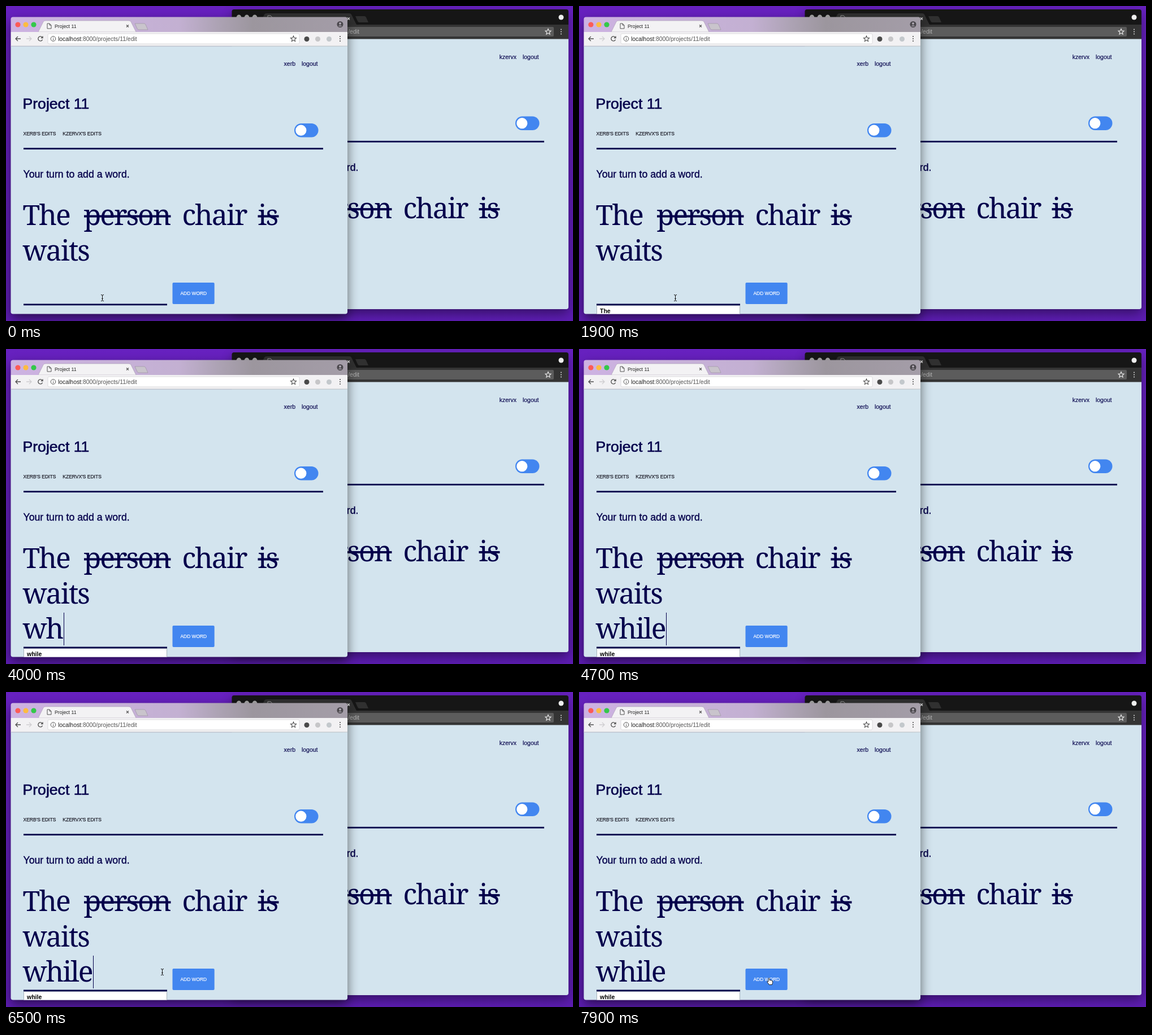
Write an HTML page that moves like this. It is 1003 px wide and 558 px high and loops after 8000 ms.

```html
<!DOCTYPE html>
<html lang="en">
<head>
<meta charset="utf-8">
<title>Project 11</title>
<style>
html, body { margin: 0; width: 100%; height: 100%; overflow: hidden; background: #6120b7; }
svg { display: block; width: 1003px; height: 558px; }
text { font-family: "Liberation Sans", Arial, sans-serif; fill: #04004b; white-space: pre; }
.nav { font-size: 10.5px; stroke: #04004b; stroke-width: .15; }
.title { font-size: 26.6px; stroke: #04004b; stroke-width: .6; }
.turn { font-size: 17.7px; stroke: #04004b; stroke-width: .35; }
.tab { font-size: 8.5px; fill: #1c1c28; stroke: #1c1c28; stroke-width: .25; }
.word { font-family: "Noto Serif", "Liberation Serif", serif; font-size: 50px; letter-spacing: -2px; }
.btn { font-size: 8.4px; fill: #fff; stroke: #fff; stroke-width: .2; }
.hint { font-size: 10.5px; font-weight: bold; fill: #000; }
.line { fill: none; stroke: #505050; stroke-width: 1.3; }
</style>
</head>
<body>
<svg viewBox="0 0 1003 558">
  <defs>
    <linearGradient id="desk" x2="0" y2="1">
      <stop stop-color="#6721bf"/><stop offset="1" stop-color="#5d1db2"/>
    </linearGradient>
    <linearGradient id="bar">
      <stop stop-color="#cdb2e2"/><stop offset=".5" stop-color="#c3b0d2"/>
      <stop offset=".62" stop-color="#aca2b3"/><stop offset=".72" stop-color="#9c969e"/>
      <stop offset="1" stop-color="#a49da8"/>
    </linearGradient>
    <filter id="blur" x="-20%" y="-20%" width="140%" height="140%"><feGaussianBlur stdDeviation="10"/></filter>
    <clipPath id="front"><rect x="8.5" y="19.5" width="595.5" height="526" rx="4"/></clipPath>
    <clipPath id="back"><rect x="399.5" y="6" width="595.5" height="531" rx="4"/></clipPath>
    <path id="star" d="M0-5 1.4-1.7 5-1.4 2.3 1 3.1 4.5 0 2.6-3.1 4.5-2.3 1-5-1.4-1.4-1.7Z" fill="none" stroke-width="1.1"/>
    <path id="cross" d="M-2-2 2 2M2-2-2 2" stroke-width="1.1"/>
    <g id="dots"><circle cy="-4" r="1.1"/><circle r="1.1"/><circle cy="4" r="1.1"/></g>
  </defs>

  <rect width="1003" height="558" fill="url(#desk)"/>
  <rect x="400" y="14" width="595" height="531" fill="#000" opacity=".42" filter="url(#blur)"/>
  <g clip-path="url(#back)">
    <rect x="399" y="6" width="596" height="28" fill="#161616"/>
    <path d="M448 33 457 15Q458 13 461 13H607Q610 13 611 15L620 33Z" fill="#303030"/>
    <path d="M618 18H634Q636 18 637 20L641 29H625Q623 29 622 27Z" fill="#303030"/>
    <g fill="#a8a8a8"><circle cx="412" cy="20" r="4.4"/><circle cx="426" cy="20" r="4.4"/><circle cx="440" cy="20" r="4.4"/></g>
    <path d="M463 25V17H468L471 20V25" fill="none" stroke="#999"/>
    <use href="#cross" x="606" y="22.5" stroke="#ddd"/>
    <circle cx="982" cy="20" r="4.5" fill="#eee"/>
    <rect x="399" y="33" width="596" height="26" fill="#343434"/>
    <rect x="465" y="37" width="504" height="17" rx="2" fill="#5c5c5c"/>
    <text x="625" y="49" text-anchor="end" font-size="10.5" style="fill:#b4b4b4">localhost:8000/projects/11/edit</text>
    <use href="#star" x="959" y="45.5" stroke="#eee"/>
    <use href="#dots" x="982" y="45.5" fill="#ccc"/>
    <rect x="399" y="58.5" width="596" height="479" fill="#d3e4ee"/>
    <g id="page2" transform="translate(391 -12.5)"></g>
  </g>

  <rect x="9" y="28" width="595" height="525" fill="#000" opacity=".55" filter="url(#blur)"/>
  <g clip-path="url(#front)">
    <rect x="8" y="19" width="596" height="27" fill="url(#bar)"/>
    <circle cx="21" cy="33" r="4.6" fill="#fc5b57"/>
    <circle cx="35" cy="33" r="4.6" fill="#fdbc40"/>
    <circle cx="49" cy="33" r="4.6" fill="#34c84a"/>
    <path d="M57 46 66 28Q67 26 70 26H217Q220 26 221 28L230 46Z" fill="#f3f2f4" stroke="#a79bb0" stroke-width=".6"/>
    <path d="M228 31H244Q246 31 247 33L251 42H235Q233 42 232 40Z" fill="#c9c4cc" stroke="#9e94a5" stroke-width=".7"/>
    <path d="M73 31H77L80 34V40H73ZM77 31V34H80" fill="none" stroke="#555"/>
    <text x="86" y="38.5" font-size="8.7" style="fill:#222">Project 11</text>
    <use href="#cross" x="215" y="35.5" stroke="#555"/>
    <circle cx="591" cy="32.5" r="5.5" fill="#4b484d"/>
    <circle cx="591" cy="31" r="1.9" fill="#b0a9b4"/>
    <path d="M587.5 36Q591 32.5 594.5 36Z" fill="#b0a9b4"/>
    <rect x="8" y="46" width="596" height="25.5" fill="#f2f1f3"/>
    <rect x="8" y="70.5" width="596" height="1" fill="#c2c6ca"/>
    <path class="line" d="M26 58H17M21 54 17 58 21 62"/>
    <path class="line" d="M36 58H45M41 54 45 58 41 62" style="stroke:#cfced1"/>
    <path class="line" d="M64 55.5A4 4 0 1 0 64.5 59.5M65 53.5V56.5H62"/>
    <rect x="74" y="49" width="445" height="18" rx="2" fill="#fff" stroke="#d4d3d6" stroke-width=".8"/>
    <circle class="line" cx="83.5" cy="58" r="4.3" style="stroke-width:1"/>
    <path class="line" d="M83.5 57.5V60.5M83.5 55.3V56.3" style="stroke-width:1"/>
    <text x="92" y="62" font-size="10.4" style="fill:#222">localhost<tspan fill="#555">:8000/projects/11/edit</tspan></text>
    <use href="#star" x="508.5" y="58" stroke="#505050"/>
    <circle cx="532" cy="58.5" r="4.5" fill="#4a4a4a"/>
    <circle cx="551.5" cy="58.5" r="4.5" fill="#c6c6c8"/>
    <circle cx="571.5" cy="58.5" r="4.5" fill="#c3c8cc"/>
    <use href="#dots" x="591" y="58" fill="#505050"/>
    <rect x="8" y="71.5" width="596" height="475" fill="#d3e4ee"/>
    <g id="page1"></g>
    <text id="typed" class="word" x="29.5" y="512.5"></text>
    <rect id="caret" y="467" width="1" height="58" fill="#04004b"/>
    <g id="list">
      <rect x="31.5" y="530.5" width="253" height="24" fill="#fff" stroke="#a9b4bc"/>
      <text id="hint" class="hint" x="37" y="543.5"></text>
    </g>
    <rect x="31" y="527.5" width="254" height="2.8" fill="#04004b"/>
    <rect x="294.5" y="490" width="74.2" height="38" rx="2" fill="#4286f0"/>
    <text class="btn" x="308.5" y="512">ADD WORD</text>
  </g>

  <path id="beam" d="M-2.5-5.5Q0-5.5 0-4Q0-5.5 2.5-5.5M0-4V4.5M-2.5 5.5Q0 5.5 0 4.5Q0 5.5 2.5 5.5M-1.3 1.5H1.3" fill="none" stroke="#111"/>
  <path id="hand" d="M-2.5 1V-4.5Q-1.5-6.5-.5-4.5V-1.5Q1-2.5 1.5-1Q3-1.8 3.3-.5Q5-.8 5 1V3.5Q4 5 4 6.5H-1.5Q-2 4.5-4.5 2Q-5-.5-2.5 1Z" fill="#fff" stroke="#111" stroke-width=".9"/>
</svg>
<script>
const $ = id => document.getElementById(id);
const LOOP = 8000, BLINK = 510, FOCUS = 1380;
const HIDE = 3750, MOVE = 5950;
const WORD = "while", KEYS = [3750, 3900, 4060, 4180, 4300];
// time, x, y of the pointer
const PATH = [[MOVE, 170, 517], [6500, 276, 496], [7100, 337, 512]];

const label = (cls, x, y, s, end) =>
  `<text class="${cls}" x="${x}" y="${y}"${end ? ' text-anchor="end"' : ""}>${s}</text>`;
const strike = (x, w) => `<rect x="${x}" y="370.5" width="${w}" height="4" fill="#04004b"/>`;

function page(user, turn, end) {
  return label("nav", 512, 106, user, true) + label("nav", 551.5, 106, "logout", true) +
    label("title", 29.5, 181.5, "Project 11") +
    label("tab", 30.5, 228.5, "XERB'S EDITS") + label("tab", 100.3, 228.5, "KZERVX'S EDITS") +
    `<rect x="510" y="208" width="42.5" height="24.5" rx="12.2" fill="#4286f0"/>
     <circle cx="521.8" cy="220.2" r="9.6" fill="#fff"/>
     <rect x="31" y="251.3" width="530" height="2.8" fill="#04004b"/>` +
    label("turn", end || 30.5, 304, turn, end) +
    label("word", 29.5, 388, "The") + label("word", 137.5, 388, "person") +
    label("word", 311.5, 388, "chair") + label("word", 445.5, 388, "is") +
    strike(138, 153.5) + strike(445.5, 37) + label("word", 29.5, 450.5, "waits");
}
$("page1").innerHTML = page("xerb", "Your turn to add a word.");
$("page2").innerHTML = page("kzervx", "Waiting for a word.", 232.5);

const show = (el, on) => el.setAttribute("visibility", on ? "visible" : "hidden");

function pointer(t) {
  if (t <= PATH[0][0]) return PATH[0].slice(1);
  for (let i = 1; i < PATH.length; i++) {
    const [t0, x0, y0] = PATH[i - 1], [t1, x1, y1] = PATH[i];
    if (t < t1) {
      const p = (t - t0) / (t1 - t0), k = p * p * (3 - 2 * p);
      return [x0 + (x1 - x0) * k, y0 + (y1 - y0) * k];
    }
  }
  return PATH[PATH.length - 1].slice(1);
}

function draw(t) {
  const count = KEYS.filter(k => k <= t).length;
  const typed = $("typed");
  typed.textContent = WORD.slice(0, count);
  $("hint").textContent = count ? WORD : "The";
  show($("list"), t >= FOCUS);

  const since = t - (count ? KEYS[count - 1] : FOCUS);
  show($("caret"), t >= FOCUS && since % (2 * BLINK) < BLINK);
  $("caret").setAttribute("x", Math.round(31 + (count ? typed.getComputedTextLength() : 0)));

  const [x, y] = pointer(t), over = x >= 295, seen = t < HIDE || t > MOVE;
  for (const id of ["beam", "hand"]) $(id).setAttribute("transform", `translate(${x + .5} ${y})`);
  show($("beam"), seen && !over);
  show($("hand"), seen && over);
}

const start = performance.now();
function tick() {
  draw((performance.now() - start) % LOOP);
  requestAnimationFrame(tick);
}
tick();
</script>
</body>
</html>
```
